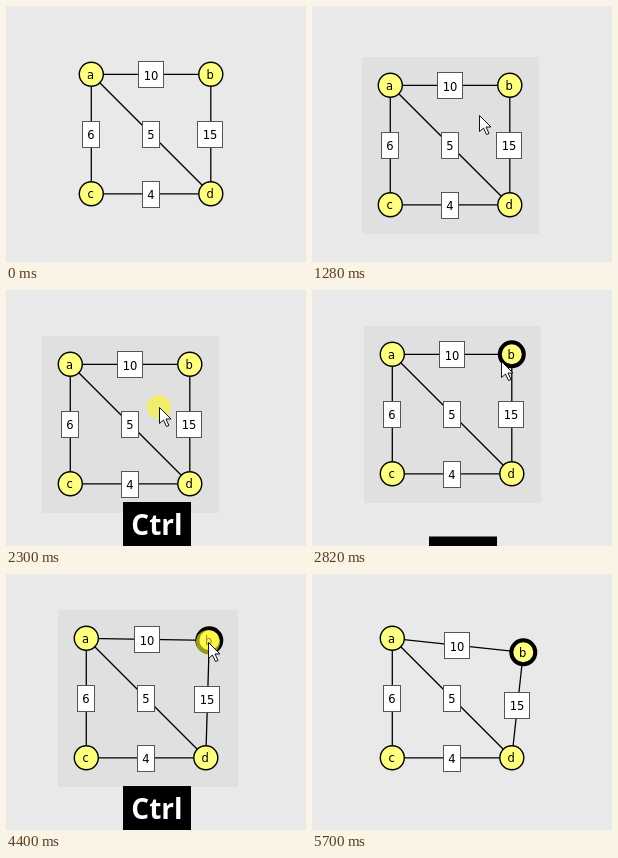
These frames come from a looping animation (300 px wide and 256 px high, 6.07 s). An HTML page with a canvas:

```html
<!DOCTYPE html>
<html lang="en">
<head>
<meta charset="utf-8">
<title>Graph dragging</title>
<style>
html, body { margin: 0; width: 100%; height: 100%; overflow: hidden; background: #e9e9e9; }
canvas { display: block; width: 300px; height: 256px; }
</style>
</head>
<body>
<canvas id="stage" width="300" height="256"></canvas>
<script>
const ctx = document.getElementById('stage').getContext('2d');
const LOOP = 6070, SIZE = 119.5, LAG = 25;

// A drag swings through its stops at an even pace; the pointer holds on at "grip".
const drags = [
  { moves: 'graph', from: 100, to: 1050, release: 1280, grip: [89, 30],
    stops: [[85, 68], [89, 115], [102, 68], [42, 106], [78, 79]] },
  { moves: 'graph', from: 1480, to: 2680, release: 2720, grip: [86, 43],
    stops: [[78, 79], [91, 58], [80, 41], [56, 72], [77, 76], [80, 64]] },
  { moves: 'node', from: 2880, to: 3280, release: 3510, grip: [-1, -9],
    stops: [[200, 64], [84, 108], [188, 100]] },
  { moves: 'node', from: 3560, to: 4820, release: 4960, grip: [-1, 2],
    stops: [[188, 100], [83, 130], [200, 62], [204, 67], [211, 78]] }
];
const click = { at: [60, 63], from: 5250, release: 5380 };

const clamp = v => Math.max(0, Math.min(1, v));
const ease = v => { v = clamp(v); return v * v * (3 - 2 * v); };
const within = (t, from, to) => t >= from && t < to;
const add = (p, q) => [p[0] + q[0], p[1] + q[1]];
const mix = (p, q, k) => [p[0] + (q[0] - p[0]) * k, p[1] + (q[1] - p[1]) * k];

function swing({ from, to, stops }, t) {
  const legs = stops.length - 1;
  const s = clamp((t - from) / (to - from)) * legs;
  const i = Math.min(Math.floor(s), legs - 1);
  return mix(stops[i], stops[i + 1], ease(s - i));
}

function place(what, t) {
  const own = drags.filter(d => d.moves === what);
  const drag = own.filter(d => t >= d.from).pop() || own[0];
  return swing(drag, t).map(v => Math.round(v) + 0.3);
}

function pointer(t) {
  const i = Math.max(0, drags.filter(d => t >= d.from).length - 1);
  const drag = drags[i], next = drags[i + 1];
  const held = add(swing(drag, t + LAG), drag.grip);
  const goal = next ? add(next.stops[0], next.grip) : click.at;
  const arrive = (next || click).from;
  return mix(held, goal, ease((t - drag.release) / (arrive - drag.release)));
}

function text(s, x, y) {
  ctx.fillStyle = '#000';
  ctx.font = '11.5px "DejaVu Sans", Verdana, sans-serif';
  ctx.textAlign = 'center';
  ctx.fillText(s, x, Math.round(y + 4.5));
}

function disc(p, r) {
  ctx.beginPath();
  ctx.arc(p[0], p[1], r, 0, 2 * Math.PI);
}

function edge(p, q, weight) {
  ctx.strokeStyle = '#000';
  ctx.lineWidth = 1.3;
  ctx.beginPath();
  ctx.moveTo(...p);
  ctx.lineTo(...q);
  ctx.stroke();
  const [x, y] = mix(p, q, 0.5), w = weight.length > 1 ? 25 : 17;
  const left = Math.round(x - w / 2) - 0.5, top = Math.round(y - 13) + 0.5;
  ctx.fillStyle = '#fff';
  ctx.fillRect(left, top, w, 26);
  ctx.strokeStyle = '#555';
  ctx.lineWidth = 1;
  ctx.strokeRect(left, top, w, 26);
  text(weight, left + w / 2, y + 0.7);
}

function node(name, p, active) {
  disc(p, 12);
  ctx.fillStyle = '#ffff80';
  ctx.fill();
  ctx.strokeStyle = '#000';
  ctx.lineWidth = active ? 4 : 1.4;
  ctx.stroke();
  text(name, p[0] - 0.7, p[1]);
}

function selection(points) {
  const span = axis => {
    const values = points.map(p => p[axis]);
    const low = Math.floor(Math.min(...values)) - 28;
    return [low, Math.round(Math.max(...values)) + 29 - low];
  };
  const [x, w] = span(0), [y, h] = span(1);
  ctx.fillStyle = '#e0e0e0';
  ctx.fillRect(x, y, w, h);
}

function cursor(p) {
  ctx.save();
  ctx.translate(p[0] + 0.5, p[1] + 0.5);
  const arrow = new Path2D('M0 0V16L4 12.5 7 19 9.5 18 6.5 11.5H11.5Z');
  ctx.fillStyle = '#fff';
  ctx.fill(arrow);
  ctx.strokeStyle = '#111';
  ctx.lineWidth = 1;
  ctx.stroke(arrow);
  ctx.restore();
}

function keyBadge(t, from, to) {
  const shown = Math.min(ease((t - from) / 130), ease((to - t) / 130));
  if (!shown) return;
  const y = 212 + 44 * (1 - shown);
  ctx.fillStyle = '#000';
  ctx.fillRect(117, y, 68, 46);
  ctx.fillStyle = '#fff';
  ctx.font = 'bold 28px "Open Sans", "Noto Sans", sans-serif';
  ctx.textAlign = 'center';
  ctx.fillText('Ctrl', 151, y + 33);
}

function draw(t) {
  ctx.fillStyle = '#e9e9e9';
  ctx.fillRect(0, 0, 300, 256);

  const a = place('graph', t);
  const b = t < drags[2].from ? add(a, [SIZE, 0]) : place('node', t);
  const c = add(a, [0, SIZE]), d = add(a, [SIZE, SIZE]);

  if (within(t, drags[0].from, click.from)) selection([a, b, c, d]);
  edge(a, b, '10');
  edge(a, c, '6');
  edge(a, d, '5');
  edge(b, d, '15');
  edge(c, d, '4');
  node('a', a);
  node('b', b, t >= 2820);
  node('c', c);
  node('d', d);

  const tip = pointer(t).map(Math.round);
  if ([...drags, click].some(e => within(t, e.from, e.release))) {
    disc(tip, 12);
    ctx.fillStyle = 'rgba(248,244,40,0.62)';
    ctx.fill();
  }
  if (within(t, 40, 5430)) cursor(tip);

  keyBadge(t, 1490, 2860);
  keyBadge(t, 3530, 5130);
}

function loop() {
  draw(performance.now() % LOOP);
  requestAnimationFrame(loop);
}
loop();
</script>
</body>
</html>
```
